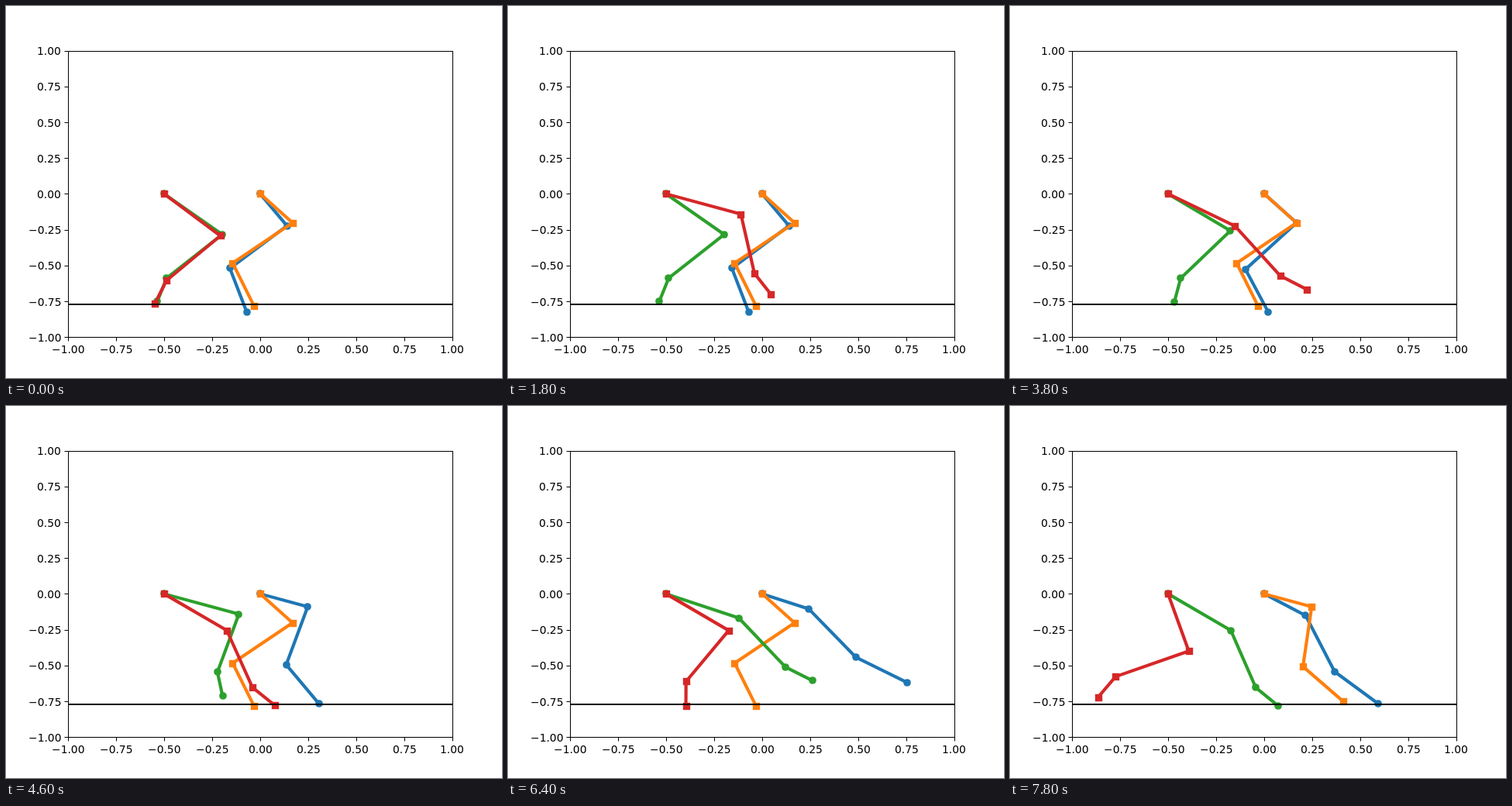
Animation, 640 px wide and 480 px high, one loop 8000 ms. Source, as an HTML page with a canvas:

```html
<!DOCTYPE html>
<html lang="en">
<head>
<meta charset="utf-8">
<title>Walking legs</title>
<style>
  html, body { margin: 0; width: 100%; height: 100%; overflow: hidden; background: #fff; }
  canvas { display: block; }
</style>
</head>
<body>
<canvas id="stage" width="640" height="480"></canvas>
<script>
const ctx = document.getElementById('stage').getContext('2d');
const LOOP = 8000, STEP = 200;
const toX = x => 328 + x * 248;
const toY = y => 242.4 - y * 184.8;

const FRONT = { hip: 0, lengths: [0.263, 0.42, 0.32], planted: 35 };
const REAR = { hip: -0.5, lengths: [0.414, 0.42, 0.17], planted: 38 };

// All legs share one gait; each starts it from its own pose after its own delay.
const legs = [
  { ...FRONT, color: '#1f77b4', round: true, delay: 3180, thigh: 58, knee: 77, ankle: 61 },
  { ...FRONT, color: '#ff7f0e', delay: 6257, thigh: 50.2, knee: 87.7, ankle: 68.3 },
  { ...REAR, color: '#2ca02c', round: true, delay: 3180, thigh: 43.2, knee: 90.2, ankle: 26.7 },
  { ...REAR, color: '#d62728', delay: 0, thigh: 45, knee: 86.9, ankle: 21.4 }
];

const mix = (a, b, part) => a + (b - a) * part;
const progress = (time, from, to) => Math.min(1, Math.max(0, (time - from) / (to - from)));
function ease(time, from, to) {
  const p = progress(time, from, to);
  return p * p * (3 - 2 * p);
}
const easeOut = (time, from, to) => 1 - (1 - progress(time, from, to)) ** 2;

// Angles of thigh, shank and foot in degrees below horizontal.
function pose(leg, time) {
  const lift = ease(time, 300, 1400);
  let thigh = mix(leg.thigh, 20, lift);
  thigh = mix(thigh, leg.planted, ease(time, 2700, 4400));
  thigh = mix(thigh, 76.5, ease(time, 6350, 8000));

  const knee = mix(leg.knee, 87, lift)
    - 48 * easeOut(time, 1400, 2600)
    - 16 * ease(time, 2600, 3800)
    + 67 * ease(time, 3800, 7000)
    - 10 * progress(time, 7000, 7800);

  const ankle = mix(leg.ankle, 20.5, ease(time, 800, 2400)) + 12 * ease(time, 3200, 7000);
  return [thigh, thigh + knee, thigh + knee - ankle];
}

function line(points, width, color) {
  ctx.beginPath();
  points.forEach(([x, y]) => ctx.lineTo(x, y));
  ctx.lineWidth = width;
  ctx.strokeStyle = color;
  ctx.stroke();
}

function marker(x, y, round) {
  const cx = Math.round(x), cy = Math.round(y);
  ctx.beginPath();
  if (round) ctx.arc(cx, cy, 4.86, 0, 2 * Math.PI);
  else ctx.rect(cx - 4.19, cy - 4.19, 9.38, 9.38);
  ctx.fill();
}

function drawLeg(leg, time) {
  let x = leg.hip, y = 0;
  const joints = [[toX(x), toY(y)]];
  pose(leg, time - leg.delay).forEach((degrees, i) => {
    const angle = degrees * Math.PI / 180;
    x += leg.lengths[i] * Math.cos(angle);
    y -= leg.lengths[i] * Math.sin(angle);
    joints.push([toX(x), toY(y)]);
  });
  ctx.lineCap = 'square';
  ctx.lineJoin = 'round';
  line(joints, 4.17, leg.color);
  ctx.fillStyle = leg.color;
  joints.forEach(([jx, jy]) => marker(jx, jy, leg.round));
}

// Places the inked part of a label: align 0.5 centres it on x, align 1 ends it at x.
function drawLabel(label, x, baseline, align) {
  const { actualBoundingBoxLeft: left, actualBoundingBoxRight: right } = ctx.measureText(label);
  ctx.fillText(label, Math.round(x - mix(-left, right, align)), baseline);
}

function drawAxes() {
  ctx.lineCap = 'butt';
  ctx.lineJoin = 'miter';
  line([[80, 385], [576, 385]], 2, '#000');
  ctx.lineWidth = 1;
  ctx.strokeRect(80.5, 58.5, 496, 369);
  ctx.fillStyle = '#000';
  ctx.font = '13.89px "DejaVu Sans", sans-serif';
  for (let value = -1; value <= 1; value += 0.25) {
    const label = value.toFixed(2).replace('-', '\u2212');
    const x = Math.round(toX(value)) + 0.5, y = Math.round(toY(value)) + 0.5;
    line([[x, 428], [x, 432.5]], 1, '#000');
    line([[75.5, y], [80, y]], 1, '#000');
    drawLabel(label, toX(value), 448, 0.5);
    drawLabel(label, 70.3, Math.round(toY(value) + 5.5), 1);
  }
}

function draw() {
  const time = Math.floor(performance.now() % LOOP / STEP) * STEP;
  ctx.fillStyle = '#fff';
  ctx.fillRect(0, 0, 640, 480);
  legs.forEach(leg => drawLeg(leg, time));
  drawAxes();
  requestAnimationFrame(draw);
}
draw();
</script>
</body>
</html>
```
